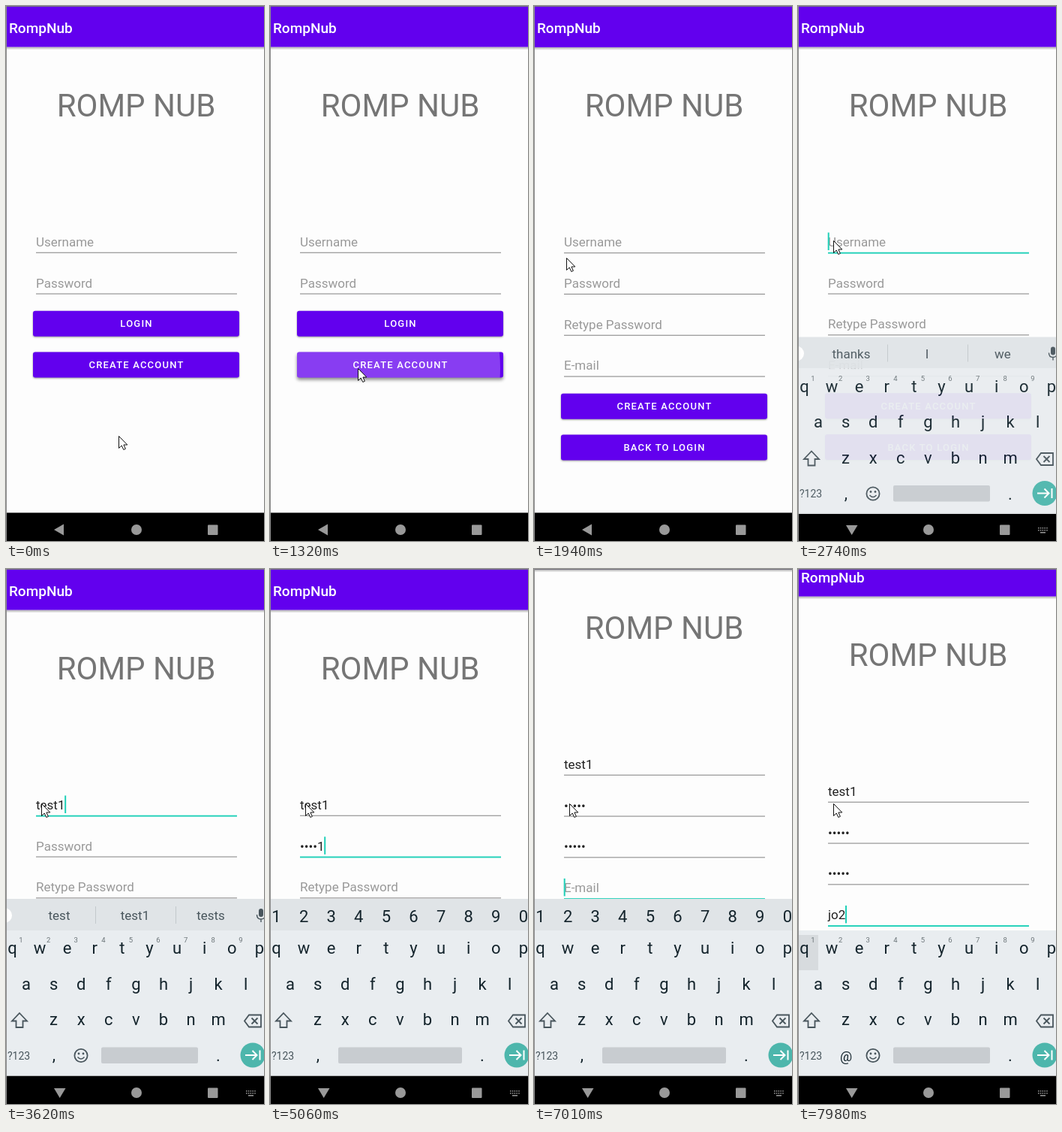
Write an HTML page that moves like this. It is 344x712 px and loops after 8 s.

```html
<!DOCTYPE html>
<html lang="en">
<head>
<meta charset="utf-8">
<title>Sign-up demo</title>
<style>
html, body { margin: 0; width: 100%; height: 100%; overflow: hidden; background: #fdfdfd; }
svg { display: block; width: 344px; height: 712px; font-family: Roboto, sans-serif; }
text { white-space: pre; }
.mid { text-anchor: middle; }
.bar { font-size: 19px; font-weight: 500; fill: #fff; }
.title { font-size: 42px; fill: #757575; }
.field { font-size: 17px; }
.btn rect { fill: #6200ee; filter: drop-shadow(0 1px 1px rgba(0,0,0,.4)); }
.btn.down rect { filter: drop-shadow(0 3px 2px rgba(0,0,0,.45)); }
.btn text { font-size: 13px; font-weight: 500; letter-spacing: 1.2px; fill: #fff; }
.key { font-size: 22px; fill: #14242c; }
.sup { font-size: 9.5px; fill: #6b7478; }
.word { font-size: 17px; fill: #48555c; }
.line { fill: none; stroke: #48555c; stroke-width: 1.8; }
</style>
</head>
<body>
<svg id="stage" viewBox="0 0 344 712"></svg>
<script>
const LOOP = 8000, PITCH = 54.8, TEAL = '#1fd0b8';
const BASE = {
  cur: [150, 572], ripple: 0, reveal: null, shift: 0, signup: false,
  focus: -1, caret: true, scroll: 0, kb: '', fade: 1, nav: false, press: false,
  words: ['thanks', 'I', 'we'], vals: ['', '', '', '']
};

// [time, changes]; "type" fills the focused field
const STEPS = [
  [0, {}],
  [250, { cur: [12, 482] }],
  [410, { cur: [63, 422] }],
  [560, { cur: [117, 453] }],
  [710, { cur: [117, 461] }],
  [830, { cur: [117, 470] }],
  [950, { cur: [117, 478] }],
  [1080, { cur: [117, 482] }],
  [1320, { ripple: 190 }],
  [1440, { ripple: 260 }],
  [1560, { signup: true, reveal: 400, shift: 20 }],
  [1680, { reveal: 110, shift: 9 }],
  [1800, { reveal: null, shift: 3, ripple: 0, cur: [80, 420] }],
  [1940, { shift: .4, cur: [43, 335] }],
  [2060, { shift: 0, cur: [46, 322] }],
  [2180, { cur: [47, 316] }],
  [2330, { cur: [47, 312] }],
  [2470, { focus: 0 }],
  [2590, { nav: true }],
  [2740, { kb: 'text', fade: .95 }],
  [2870, { fade: 1 }],
  [3010, { type: 't', words: ['to', 'the', 'that'] }],
  [3130, { type: 'te', words: ['tell', 'te', 'ten'] }],
  [3250, { type: 'tes', words: ['test', 'tes', 'tested'] }],
  [3370, { type: 'test', words: ['tests', 'test', 'testing'] }],
  [3620, { type: 'test1', words: ['test', 'test1', 'tests'] }],
  [3900, { focus: 1, kb: 'num' }],
  [4020, { type: 't' }],
  [4170, { type: '•e' }],
  [4290, { type: '••s' }],
  [4410, { type: '•••t' }],
  [4940, { type: '••••' }],
  [5060, { type: '••••1' }],
  [5480, { focus: 2, scroll: 3 }],
  [5600, { scroll: 5, type: 't' }],
  [5720, { type: '•e' }],
  [6000, { type: '•••t' }],
  [6500, { caret: false }],
  [6750, { caret: true, type: '••••1' }],
  [7010, { focus: 3, scroll: 54 }],
  [7160, { scroll: 59 }],
  [7310, { kb: 'mail', scroll: 36 }],
  [7430, { scroll: 18, press: true }],
  [7740, { type: 'j' }],
  [7860, { type: 'jo' }],
  [7980, { type: 'jo2' }]
];

let last = BASE;
const states = STEPS.map(([at, { type, ...change }]) => {
  const next = { ...last, ...change, at, vals: [...last.vals] };
  if (type) next.vals[next.focus] = type;
  if (next.focus !== last.focus)
    for (const i of [1, 2]) next.vals[i] = next.vals[i].replace(/./g, '•');
  return last = next;
});

const text = (x, y, s, cls, extra = '') => `<text x="${x}" y="${y}" class="${cls}" ${extra}>${s}</text>`;
const rect = (x, y, w, h, fill, extra = '') =>
  `<rect x="${x}" y="${y}" width="${w}" height="${h}" fill="${fill}" ${extra}/>`;
const path = (d, extra) => `<path d="${d}" ${extra}/>`;

function button(y, label, id) {
  return `<g class="btn" id="${id}">${rect(36, y, 275, 34, '#6200ee', 'rx="3"')}
    ${id === 'join' ? '<circle id="ripple" cx="117" cy="482" fill="#fff" opacity=".24" clip-path="url(#joinClip)"/>' : ''}
    ${text(174, y + 21.7, label, 'mid')}</g>`;
}

function screen(id, hints, buttons) {
  const fields = hints.map((h, i) => {
    const y = 319.7 + i * PITCH;
    return text(40, y, h, 'field', `fill="#999" data-hint="${h}"`) +
      rect(40, y + 8, 268, 1.1, '#8c8c8c', 'class="under"');
  }).join('');
  const top = 296.1 + hints.length * PITCH;
  return `<g id="${id}">${rect(0, 0, 344, 780, '#fdfdfd')}
    ${rect(0, 54.5, 344, 4, 'url(#shade)')}${rect(0, 0, 344, 54.5, '#6200ee')}
    ${text(4, 36, 'RompNub', 'bar')}${text(173.5, 147, 'ROMP NUB', 'title mid')}
    ${fields}${buttons.map(([label, key], i) => button(top + i * PITCH, label, key)).join('')}</g>`;
}

const row = (keys, x, y) => [...keys].map((k, i) => text(x + i * 36.6, y, k, 'key mid')).join('');

function keyboard(kind) {
  const num = kind === 'num', mail = kind === 'mail';
  let top = '';
  if (num) top = rect(0, 439, 344, 42, '#e0e4e7') + row('1234567890', 8.5, 469.5);
  if (kind === 'text') top = rect(0, 439, 344, 42, '#e0e4e7') +
    '<circle cx="-2" cy="461" r="10" fill="#fff"/>' +
    [71, 172, 273].map(x => text(x, 467, '', 'word mid')).join('') +
    rect(119, 449, 1, 23, '#c3c9cc') + rect(226, 449, 1, 23, '#c3c9cc') +
    rect(337, 452, 6, 11, '#48555c', 'rx="3"') +
    path('M334.500 460q0 6 5.500 6t5.500-6M340 466v4', 'class="line" style="stroke-width:1.4"');
  const sups = num ? '' : [...'123456789'].map((n, i) => text(20 + i * 36.6, 497, n, 'sup mid')).join('');
  const smile = num ? '' : '<circle cx="100" cy="647.500" r="8.600" class="line"/>' +
    '<circle cx="97" cy="645" r="1.400" fill="#48555c"/><circle cx="103" cy="645" r="1.400" fill="#48555c"/>' +
    path('M95.500 649.500q4.500 5 9 0', 'class="line" style="stroke-width:1.500"');
  const space = num ? 91 : 127;
  return `<g id="${kind}">${rect(0, 481, 344, 193.5, '#e9edf0')}${top}
    ${mail ? rect(0, 487, 27, 47, '#d7dbde', 'id="press"') : ''}
    ${row('qwertyuiop', 8.5, 512)}${sups}${row('asdfghjkl', 27, 559.5)}${row('zxcvbnm', 63.5, 607.3)}
    ${path('M18 591L28 601.500H22.500V610H13.500V601.500H8Z', 'class="line"')}
    ${path('M324 593.500H340V609.500H324L318 601.500ZM327.500 597.500l8 8m0-8l-8 8', 'class="line"')}
    ${text(2, 652.5, '?123', 'word', 'style="font-size:14px"')}
    ${text(64, mail ? 655 : 654, mail ? '@' : ',', 'key mid', mail ? 'style="font-size:18px"' : '')}
    ${smile}${rect(space, 636.5, 256 - space, 21.5, '#c8ccd0', 'rx="2"')}${text(283, 655, '.', 'key mid')}
    <circle cx="329" cy="647" r="16.500" fill="#4db6ac"/>
    ${path('M319 647H334M328.500 641l6 6-6 6M338.500 640.500V653.500', 'fill="none" stroke="#fff" stroke-width="2"')}</g>`;
}

const navKeys = [0, 1, 2, 3, 4].map(i => rect(320 + i * 2.8, 694, 1.5, 1.5, '#999') +
  rect(320 + i * 2.8, 697, 1.5, 1.5, '#999')).join('') + rect(323, 700, 7, 1.5, '#999');

const stage = document.getElementById('stage');
stage.innerHTML = `<defs>
  <linearGradient id="shade" x2="0" y2="1"><stop stop-opacity=".32"/><stop offset="1" stop-opacity="0"/></linearGradient>
  <clipPath id="joinClip"><rect x="36" y="460.500" width="275" height="34" rx="3"/></clipPath>
  <clipPath id="open"><rect id="openBox" width="344" height="712"/></clipPath></defs>
  ${screen('login', ['Username', 'Password'], [['LOGIN', 'enter'], ['CREATE ACCOUNT', 'join']])}
  <g id="openWrap">${screen('signup', ['Username', 'Password', 'Retype Password', 'E-mail'],
    [['CREATE ACCOUNT', 'create'], ['BACK TO LOGIN', 'back']])}</g>
  ${rect(0, 674.4, 344, 38, '#000')}
  ${path('M64 697L77 689.500V704.500Z', 'id="navBack" fill="#999"')}
  <g id="navDown">${path('M64 691H79.500L71.700 704Z', 'fill="#999"')}${navKeys}</g>
  <circle cx="174" cy="697" r="7" fill="#999"/>${rect(269, 690.5, 13.5, 13.5, '#999', 'rx="1"')}
  <g id="kb">${['text', 'num', 'mail'].map(keyboard).join('')}</g>
  ${rect(0, 0, 344, 1, '#77747f')}${rect(0, 0, 1, 712, '#8d8d8d')}
  ${path('M.5.5V16.500L4.200 13L6.800 18.500L9.400 17.300L6.900 12H11.800Z', 'id="cursor" fill="#fff" stroke="#111"')}`;

const $ = id => document.getElementById(id);
const show = (el, on) => el.style.display = on ? '' : 'none';
const move = (el, x, y) => el.setAttribute('transform', `translate(${x} ${y})`);
const labels = [...$('signup').querySelectorAll('.field')];
const unders = [...$('signup').querySelectorAll('.under')];
const words = [...$('text').querySelectorAll('.word.mid')];
$('signup').insertAdjacentHTML('beforeend', rect(0, 0, 2, 23.5, TEAL, 'id="caret"'));

function draw(s) {
  move($('cursor'), ...s.cur);
  $('ripple').setAttribute('r', s.ripple);
  $('join').classList.toggle('down', s.ripple > 0);
  move($('login'), 0, s.signup ? s.shift / 2 - 14 : 0);
  show($('openWrap'), s.signup);
  $('openWrap').setAttribute('clip-path', s.reveal === null ? 'none' : 'url(#open)');
  $('openBox').setAttribute('y', s.reveal || 0);
  move($('signup'), 0, s.shift - s.scroll);

  labels.forEach((el, i) => {
    el.textContent = s.vals[i] || el.dataset.hint;
    el.setAttribute('fill', s.vals[i] ? '#212121' : '#999');
    const on = i === s.focus;
    unders[i].setAttribute('fill', on ? TEAL : '#8c8c8c');
    unders[i].setAttribute('height', on ? 1.9 : 1.1);
  });
  show($('caret'), s.focus >= 0 && s.caret);
  if (s.focus >= 0) {
    const w = s.vals[s.focus] ? labels[s.focus].getComputedTextLength() : 0;
    move($('caret'), 39.7 + w, 301.5 + s.focus * PITCH);
  }

  for (const k of ['text', 'num', 'mail']) show($(k), k === s.kb);
  $('kb').setAttribute('opacity', s.fade);
  move($('kb'), 0, s.fade < 1 ? 1.5 : 0);
  words.forEach((el, i) => el.textContent = s.words[i]);
  show($('press'), s.press);
  show($('navBack'), !s.nav);
  show($('navDown'), s.nav);
}

let shown;
const start = performance.now();
function tick() {
  const t = (performance.now() - start) % LOOP;
  const s = states.findLast(v => v.at <= t);
  if (s !== shown) draw(shown = s);
  requestAnimationFrame(tick);
}
tick();
</script>
</body>
</html>
```
